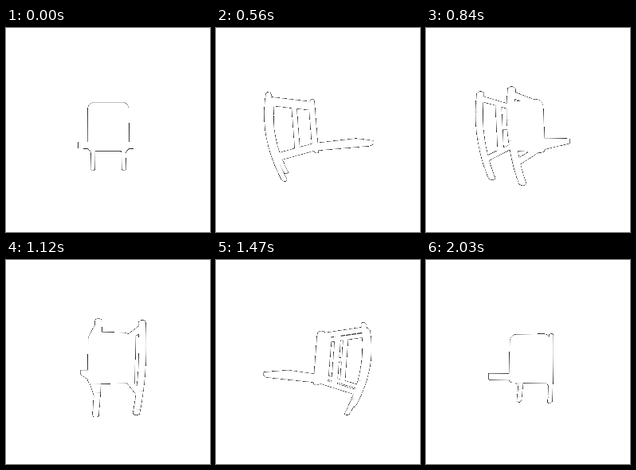
Recreate the animation shown at these times as an HTML page with a canvas. Size 256 px wide and 256 px high, loop 2.1 s.

```html
<!DOCTYPE html>
<html>
<head>
<meta charset="utf-8">
<style>
html, body { margin: 0; height: 100%; overflow: hidden; background: #fff; }
canvas { display: block; width: 100vmin; height: 100vmin; }
</style>
</head>
<body>
<canvas id="stage" width="256" height="256"></canvas>
<script>
const ctx = document.getElementById('stage').getContext('2d', { willReadFrequently: true });
const SIZE = 256, LOOP = 2100, STEPS = 30, CENTER = 128.4, CAMERA = 277;
const MIN_COVER = 24;

// Points are [width, depth, height]; the chair lies on its back.
const parts = [];
const signs = [-1, 1];

function box([w, u, y], [hw, hu, hy]) {
  return signs.flatMap(a => signs.flatMap(b => signs.map(c =>
    [w + a * hw, u + b * hu, y + c * hy])));
}

function bar(from, to, half, endHalf = half) {
  parts.push([...box(from, half), ...box(to, endHalf)]);
}

function seat() {
  const points = [];
  const corner = (w, y, r, start) => {
    for (let i = 0; i <= 6; i++) {
      const a = start + i * Math.PI / 12;
      const py = y + r * Math.sin(a), u = -7.5 + 5 * (py + 36) / 62;
      for (const depth of [0, -3]) points.push([w + r * Math.cos(a), u + depth, py]);
    }
  };
  corner(18, -28, 8.2, -Math.PI / 2);
  corner(-18, -28, 8.2, -Math.PI);
  corner(-21, 21, 5.2, Math.PI / 2);
  corner(21, 21, 5.2, 0);
  parts.push(points);
}

function rocker(w) {
  const at = y => [w, -60.5 + 0.00356 * (y + 18) ** 2, y];
  const top = -41, bottom = 56, step = 10;
  const half = [2.8, 2.6, 0], tip = [1.4, 1.3, 0];
  for (let y = top; y < bottom; y += step)
    bar(at(y), at(Math.min(bottom, y + step + 1)), half);
  bar(at(top), at(top - 1.4), half, tip);
  bar(at(bottom), at(bottom + 1.4), half, tip);
}

function side(w) {
  rocker(w);
  bar([w, -58, -35], [w, -9, -30], [2.5, 0, 2.4]);
  bar([w, -52, 33], [w, -4, 20], [2.5, 0, 2.3]);
  bar([w, -30.5, -32], [w, -26, 27], [2.2, 2.8, 0]);
}

seat();
side(-22.5);
side(22.5);
bar([-22, -28, -3], [22, -28, -3], [0, 2, 2.2]);
// Backrest, widening towards its rounded top edge
parts.push([...box([0, -4, 20.5], [22, 0, 2.8]),
            ...box([0, 56, 14.8], [30, 0, 3.2]),
            ...box([0, 62, 14], [27, 0, 1.8])]);

function project([w, u, y], cos, sin) {
  const scale = CAMERA / (CAMERA - u * cos + w * sin);
  return [CENTER + (w * cos + u * sin) * scale, CENTER + y * scale];
}

function hull(points) {
  points.sort((a, b) => a[0] - b[0] || a[1] - b[1]);
  const half = list => {
    const out = [];
    for (const p of list) {
      while (out.length > 1) {
        const [a, b] = out.slice(-2);
        if ((b[0] - a[0]) * (p[1] - a[1]) > (b[1] - a[1]) * (p[0] - a[0])) break;
        out.pop();
      }
      out.push(p);
    }
    return out.slice(0, -1);
  };
  return [...half(points), ...half([...points].reverse())];
}

function draw(angle) {
  const cos = Math.cos(angle), sin = Math.sin(angle);
  ctx.clearRect(0, 0, SIZE, SIZE);
  ctx.beginPath();
  for (const part of parts) {
    hull(part.map(p => project(p, cos, sin)))
      .forEach((p, i) => i ? ctx.lineTo(...p) : ctx.moveTo(...p));
    ctx.closePath();
  }
  ctx.fill();

  // Only partly covered edge pixels are dark, which gives the fine broken contour.
  const image = ctx.getImageData(0, 0, SIZE, SIZE), data = image.data;
  for (let i = 0; i < data.length; i += 4) {
    const cover = data[i + 3];
    data.fill(cover > MIN_COVER ? cover : 255, i, i + 3);
    data[i + 3] = 255;
  }
  ctx.putImageData(image, 0, 0);
}

const start = performance.now();
function tick() {
  const t = (performance.now() - start) % LOOP;
  draw(Math.floor(t / LOOP * STEPS) / STEPS * 2 * Math.PI);
  requestAnimationFrame(tick);
}
tick();
</script>
</body>
</html>
```
